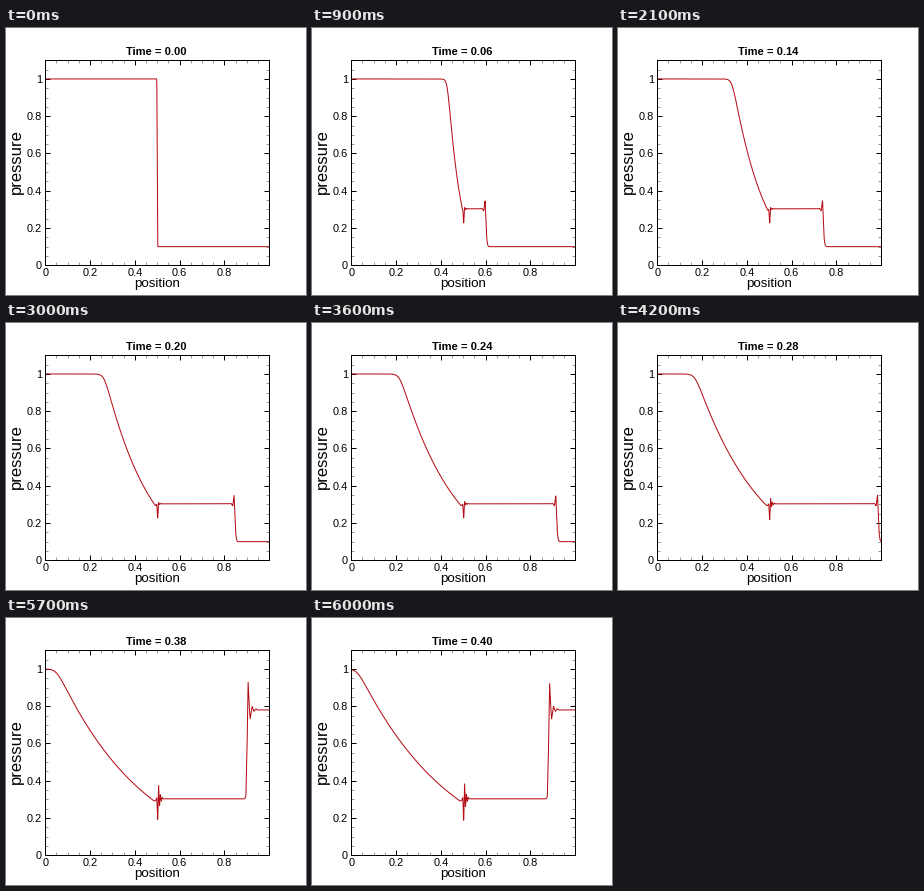
A matplotlib script that plays this animation: 300x267 px, repeating every 6300 ms.

```python
import numpy as np
import matplotlib.pyplot as plt
from matplotlib.animation import FuncAnimation

W, H, DPI = 300, 267, 100
FRAMES, INTERVAL, DT = 21, 300, 0.02
PX = 72 / DPI  # one pixel in points

C1 = np.sqrt(1.4)  # sound speed on the left
P_MID, P_LOW, P_WALL = 0.303, 0.1, 0.78
SHOCK, REFLECTED = 1.752, 1.0105
T_WALL = 0.5 / SHOCK
CELL = 0.004

plt.rcParams["font.family"] = "Liberation Sans"
x = np.linspace(CELL / 2, 1 - CELL / 2, 1400)


def rarefaction(t):
    """Expansion fan with a head that smears out in time."""
    w = 0.02 * np.sqrt(t)
    d = w * np.logaddexp(0, (x - 0.5 + C1 * t) / w)
    c = np.clip(1 - d / (6 * t * C1), 0, 1)
    return np.maximum(c ** 7, np.interp(x, [0.486, 0.505], [0.291, P_MID]))


def ripple(t):
    """Growing cell-to-cell oscillation at the diaphragm."""
    dip = max(0.078, 0.12 - 0.2625 * (0.4 - t))
    up = max(0.008, 0.082 - 0.43 * (0.4 - t))
    k = np.arange(-2, 7)
    amp = up * (-0.57) ** np.maximum(k - 1, 0)
    amp[:3] = 0, 0.15 * up, -dip
    amp[-1] = 0
    return np.interp(x, 0.5 + (k + 0.5) * CELL, amp)


def shock(t):
    """Pressure jump above the middle plateau, before or after the wall."""
    if t < T_WALL:
        d = x - 0.5 - SHOCK * t
        at = [-0.030, -0.021, -0.0135, -0.0075, -0.004, 0, 0.004, 0.009]
        p = [P_MID, 0.305, 0.292, 0.349, 0.25, 0.14, 0.108, P_LOW]
    else:
        d = x - 1 + REFLECTED * (t - T_WALL)
        at = [-0.015, -0.009, -0.004, 0.001, 0.006, 0.010,
              0.0185, 0.027, 0.035, 0.044, 0.051]
        p = [P_MID, 0.315, 0.55, 0.93, 0.80, 0.73,
             0.80, 0.772, 0.786, 0.779, P_WALL]
    return np.interp(d, at, p) - P_MID


def pressure(t):
    if t == 0:
        return np.interp(x, [0.5 - CELL / 2, 0.5 + CELL / 2], [1, P_LOW])
    return rarefaction(t) + ripple(t) + shock(t)


fig = plt.figure(figsize=(W / DPI, H / DPI), dpi=DPI, facecolor="white")
L, R, T, B = 39.2, 263.3, 32.3, 237.3
ax = fig.add_axes([L / W, 1 - B / H, (R - L) / W, (B - T) / H])
ax.set(xlim=(0, 1), ylim=(0, 1.1))
ax.set_xticks(np.arange(0, 0.9, 0.2))
ax.set_yticks(np.arange(0, 1.1, 0.2))
ax.set_xticks(np.arange(0.05, 1, 0.05), minor=True)
ax.set_yticks(np.arange(0.05, 1.1, 0.05), minor=True)
ax.tick_params(which="both", direction="in", top=True, right=True,
               labelbottom=False, labelleft=False)
ax.tick_params(which="major", length=5 * PX, width=PX, color="black")
ax.tick_params(which="minor", length=3 * PX, width=0.6 * PX, color="#555555")
for spine in ax.spines.values():
    spine.set_linewidth(PX)


def label(px, py, text, size, **kw):
    style = dict(ha="center", va="baseline", color="black") | kw
    return fig.text(px / W, 1 - py / H, text, fontsize=size * PX, **style)


for v in range(0, 10, 2):
    label(L + (R - L) * v / 10, 247.5, f"{v / 10:g}", 11)
for v in range(0, 12, 2):
    label(36, B - (B - T) * v / 11 + 4, f"{v / 10:g}", 11, ha="right")
label(151.3, 259, "position", 13.4)
label(15, 133.5, "pressure", 16.6, rotation=90, rotation_mode="anchor")

title = label(150.3, 27, "", 11.1, weight="bold")
line, = ax.plot([], [], color="#b40a14", lw=PX, solid_joinstyle="round")


def update(i):
    t = round(i * DT, 2)
    line.set_data(x, pressure(t))
    title.set_text(f"Time = {t:.2f}")
    return line, title


anim = FuncAnimation(fig, update, frames=FRAMES, interval=INTERVAL,
                     repeat=True, repeat_delay=0)
plt.show()
```
